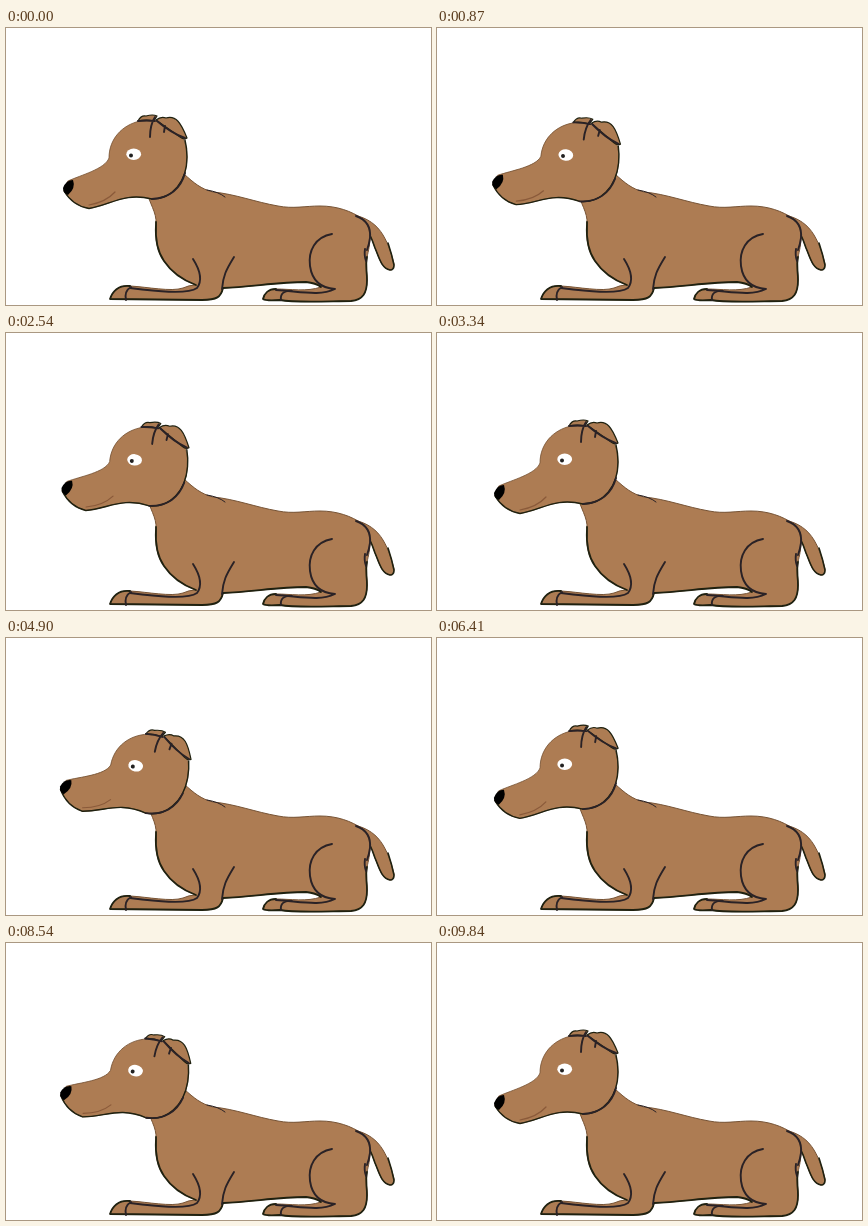
Write an HTML page with a canvas that moves like this. It is 425x277 px and loops after 9.87 s.

```html
<!DOCTYPE html>
<html lang="en">
<head>
<meta charset="utf-8">
<title>Resting dog</title>
<style>
  html, body { margin: 0; width: 100%; height: 100%; overflow: hidden; background: #fff; }
  canvas { display: block; }
</style>
</head>
<body>
<canvas id="stage" width="425" height="277"></canvas>
<script>
const ctx = document.getElementById('stage').getContext('2d');
const LOOP = 9870, NODS = 3;
const TILT = 0.18, PIVOT = [120, 138];
const COAT = '#ad7c53', INK = '#2a2226', RIM = '#765335', SHADE = '#1f2110';

const path = d => new Path2D(d);

// Upper contours are faint; the lower and right-hand ones are heavy.
const tailTop = 'M348 187 C362 190 371 197 377 207 C383 217 386 228 388 236';
const tailShade = 'M382 215 Q386 227 388 237 Q388 242 384 242 C375 240 373 229 369 220 Q366 211 363 205';
const tail = path(tailTop + ' Q388 242 384 242 C375 240 373 229 369 220 Q366 211 363 205 Z');

const chest = 'C149 212 151 223 158 233 C166 245 179 253 190 257';
const belly = 'M217 260 C245 259 272 254 300 254 Q310 255 315 259';
const body = path(`M140 160 C143 176 151 184 150 196 ${chest} Q183 257 177 260
  C165 264 142 259 124 258 C114 257 107 262 104 271 L196 272 C211 272 215 269 217 260
  C245 259 272 254 300 254 Q310 255 315 259 C301 264 284 261 270 261
  C262 261 258 266 257 271 Q260 273 274 272 C290 275 326 273 345 273
  C357 272 361 265 361 252 C361 242 359 238 361 229 C364 217 367 201 357 191
  C345 183 331 178 314 178 C299 178 287 181 272 178 C249 174 229 166 207 164
  C195 161 188 155 178 146 L160 130 Z`);
const bodyShade = path(`M150 194 L150 196 ${chest} ${belly}
  M124 258 C114 257 107 262 104 271 L196 272 C211 272 215 269 217 260
  M270 261 C262 261 258 266 257 271 Q260 273 274 272 C290 275 326 273 345 273
  C357 272 361 265 361 252 C361 242 359 238 361 229`);

const bodyLines = path(`M187 231 C194 242 197 252 191 260 C181 267 148 263 124 260
  M125 259 Q118 263 120 272
  M228 229 C220 242 217 248 216 261
  M326 206 C309 209 302 223 304 238 C306 252 314 260 329 261 C314 268 298 264 270 262
  M286 263 C278 262 274 266 275 272
  M350 188 C361 192 365 200 364 210 Q363 217 361 222
  M359 221 Q358 228 360 233`);
const backMark = path('M201 162 Q213 164 219 169');

const skull = 'M62 153 C75 147 99 141 103 130 C103 111 116 97 134 93';
const jaw = 'C118 164 105 177 83 180.5 Q67 178 58 163';
const head = path(`${skull} L160 93 C174 98 181 113 181 129 C181 153 167 171 146 171 ${jaw} Z`);
const headShade = path(`M179 112 Q181 120 181 129 C181 153 167 171 146 171 ${jaw}`);
const neckLine = path('M146 171 C164 170 175 160 179 145');
const nose = path('M57 160 Q60 152 67 152 Q70 160 62 167 Q57 165 57 160 Z');
const mouth = path('M83 177 Q100 174 109 164');
const farEar = path('M132 93 Q135 87 140 88 Q147 86 151 88 L148 93 Q140 91 132 93 Z');
const nearEar = path('M150 92 Q155 88 160 90 C170 87 175 95 181 110 Q178 112 174 109 Z');
const earLines = path('M132 93 Q141 92 149 93 M149 89 Q144 97 144 109 M151 93 Q165 105 179 110 M159 98 L158 104');

function shape(p, fill, stroke, width = 1) {
  if (fill) {
    ctx.fillStyle = fill;
    ctx.fill(p);
  }
  if (stroke) {
    ctx.strokeStyle = stroke;
    ctx.lineWidth = width;
    ctx.stroke(p);
  }
}

function oval(x, y, rx, ry, color) {
  ctx.fillStyle = color;
  ctx.beginPath();
  ctx.ellipse(x, y, rx, ry, 0, 0, 2 * Math.PI);
  ctx.fill();
}

function drawBody() {
  shape(tail, COAT, RIM);
  shape(path(tailShade), null, SHADE, 1.6);
  shape(body, COAT, RIM);
  shape(bodyShade, null, SHADE, 1.8);
  shape(bodyLines, null, INK, 1.9);
  shape(backMark, null, INK, 1);
}

function drawHead(angle) {
  ctx.save();
  ctx.translate(...PIVOT);
  ctx.rotate(angle);
  ctx.translate(-PIVOT[0], -PIVOT[1]);
  shape(head, COAT, RIM, 0.8);
  shape(headShade, null, SHADE, 1.4);
  shape(neckLine, null, INK, 1.9);
  shape(mouth, null, '#8a5a3a', 1.2);
  shape(nose, '#000');
  shape(farEar, COAT, SHADE, 1.2);
  shape(nearEar, COAT, SHADE, 1.2);
  shape(earLines, null, INK, 1.9);
  oval(127.7, 126.2, 7.4, 5.7, '#fff');
  oval(125, 127.5, 2, 2, '#222');
  ctx.restore();
}

function frame(now) {
  const phase = (now % LOOP) / LOOP * NODS * 2 * Math.PI;
  ctx.fillStyle = '#fff';
  ctx.fillRect(0, 0, 425, 277);
  drawBody();
  drawHead(TILT * (1 - Math.cos(phase)) / 2);
  requestAnimationFrame(frame);
}

ctx.lineCap = ctx.lineJoin = 'round';
frame(0);
</script>
</body>
</html>
```
